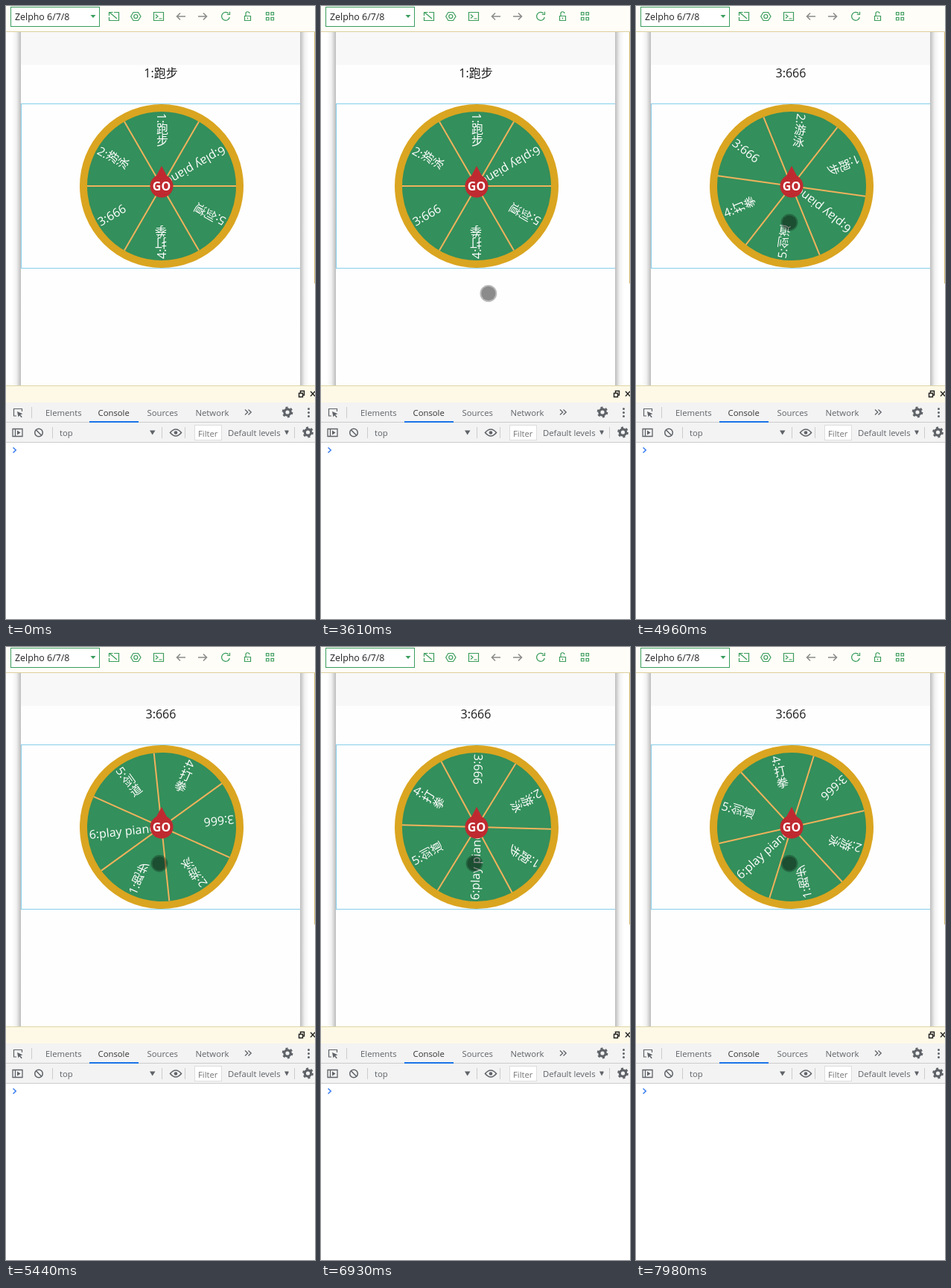
Animation of 415 by 824 pixels, one loop 8000 ms. Source, as an HTML page:

```html
<!DOCTYPE html>
<html lang="zh">
<head>
<meta charset="utf-8">
<title>Prize wheel</title>
<style>
html, body { margin: 0; width: 100%; height: 100%; overflow: hidden; background: #fff; }
svg { display: block; width: 100%; height: 100%; }
text { font-family: "Open Sans", "Noto Sans CJK SC", "Noto Sans CJK", sans-serif; white-space: pre; }
.ui { font-size: 11.3px; fill: #5f6368; }
.log text { font: 11px "DejaVu Sans Mono", monospace; fill: #303942; }
.log .warn { fill: #5c3c00; }
.link { text-decoration: underline; }
.item { font-size: 16px; fill: #fff; writing-mode: vertical-rl; text-orientation: mixed; }
.green { fill: none; stroke: #3a9d5d; stroke-width: 1.2; }
.gray { fill: none; stroke: #8c8c8c; stroke-width: 1.6; }
.tool { fill: none; stroke: #5f6368; stroke-width: 1.5; }
.rule { stroke: #ccc; }
</style>
</head>
<body>
<svg viewBox="0 0 415 824">
  <defs>
    <linearGradient id="shade">
      <stop offset="0" stop-color="#fff"/>
      <stop offset=".5" stop-color="#f1f1f1"/>
      <stop offset="1" stop-color="#bdbdbd"/>
    </linearGradient>
    <clipPath id="screen"><rect x="20" y="35" width="375" height="475"/></clipPath>
    <clipPath id="levelsClip"><rect x="296" y="562" width="27" height="24"/></clipPath>
    <g id="gear">
      <circle r="4.2" fill="none" stroke="#5f6368" stroke-width="3.2"/>
      <circle r="6.2" fill="none" stroke="#5f6368" stroke-width="2.4" stroke-dasharray="3 3.49"/>
    </g>
  </defs>

  <rect width="415" height="824" fill="#fff"/>

  <!-- phone -->
  <rect x="8" y="35" width="12" height="476" fill="url(#shade)"/>
  <rect x="8" y="35" width="12" height="476" fill="url(#shade)" transform="translate(415) scale(-1 1)"/>
  <rect x="20" y="35" width="375" height="476" fill="#fefefe"/>
  <rect x="20" y="35" width="375" height="44" fill="#f8f8f8"/>
  <path d="M414.5 35V373" stroke="#d2b96b"/>
  <g id="page" clip-path="url(#screen)">
    <text id="result" x="208" y="96" font-size="16" text-anchor="middle" fill="#1c1c1c"></text>
    <rect x="20.5" y="131.5" width="376" height="221" fill="none" stroke="#87ceeb"/>
    <g transform="translate(209 242)">
      <g id="wheel">
        <circle r="105" fill="#338f5b" stroke="#daa520" stroke-width="10"/>
      </g>
      <path d="M0-27L7.5-13H-7.5Z" fill="#bf2a30"/>
      <circle r="15.5" fill="#bf2a30"/>
      <text y="6" font-size="16" font-weight="700" text-anchor="middle" fill="#fff">GO</text>
    </g>
  </g>

  <!-- top toolbar -->
  <rect width="415" height="34" fill="#fffdf7"/>
  <path d="M0 34.5H415" stroke="#dccf9c"/>
  <rect x="6.5" y="1.5" width="119" height="26" fill="#fff" stroke="#3a9d5d"/>
  <text x="12" y="19" font-size="12.4" fill="#222">Zelpho 6/7/8</text>
  <path d="M113.5 12H120.5L117 16Z" fill="#3a9d5d"/>
  <rect id="hover" x="285.5" y="4.5" width="20" height="20" fill="#faf6e0" stroke="#d2c998"/>
  <g class="green">
    <path d="M145 8.5H151.500V19.500H138.500V15M149 17L139 8.500M138.500 13V8.500H143.500"/>
    <path d="M171 8.500H177.500L181 14L177.500 19.500H171L167.700 14Z"/>
    <circle cx="174.300" cy="14" r="2.500"/>
    <path d="M198.500 8.500H211.500V19.500H198.500ZM201 11.500L204 14L201 16.500M205.500 17H209.500"/>
    <path d="M299 10.200A5.400 5.400 0 1 0 300.300 15M300.500 7.800V11.500H296.800"/>
    <path d="M320.500 13.500H328.500V19.500H320.500ZM322 13.500V10.500A2.500 2.500 0 0 1 327 10M324.500 15.500V17.500"/>
    <path d="M349.500 8.500H353V12H349.500ZM356 8.500H359.500V12H356ZM349.500 15.500H353V19H349.500ZM356 15.500H359.500V19H356Z"/>
  </g>
  <path class="gray" d="M241 14H229.500M234 9.500L229.500 14L234 18.500M258 14H269.500M265 9.500L269.500 14L265 18.500"/>

  <!-- inspector -->
  <rect y="510" width="415" height="23" fill="#fdf9e6"/>
  <path d="M0 510.500H415" stroke="#dfd5a6"/>
  <path d="M393.500 520.500H398.500V525.500H393.500ZM395.500 520V517.500H400.500V523H399M409 518L415 524.500M415 518L409 524.500" fill="none" stroke="#222" stroke-width="1.4"/>
  <rect y="533" width="415" height="54" fill="#f3f3f3"/>
  <path class="rule" d="M0 559.500H415M0 586.500H415M34.500 539V554M62.500 566V581M209.500 566V581M240.500 566V581M387.500 566V581"/>
  <rect x="112" y="558" width="66" height="2" fill="#1a73e8"/>
  <g class="tool">
    <path d="M14 551H10.500V541.500H21.500V545" stroke-width="1.2"/>
    <path d="M15 545L22.500 548.300L19.300 549.300L21.800 552.500L20.500 553.300L18.200 550.300L16.500 552.500Z" fill="#5f6368" stroke="none"/>
    <path d="M321 542.500L324.700 546L321 549.500M325.500 542.500L329.200 546L325.500 549.500" stroke-width="1.300"/>
    <path d="M9 568.500H22V578.500H9ZM12.500 568.500V578.500" stroke-width="1.300"/>
    <path d="M15 570.500L19.500 573.500L15 576.500Z" fill="#5f6368" stroke="none"/>
    <circle cx="44" cy="573.500" r="5.300"/><path d="M40.300 569.800L47.700 577.200"/>
    <path d="M220.500 573.500Q228 564.500 235.500 573.500Q228 582.500 220.500 573.500Z" stroke-width="1.600"/>
    <circle cx="228" cy="573.500" r="2.300" fill="#5f6368" stroke="none"/>
  </g>
  <g fill="#5f6368">
    <circle cx="406.500" cy="541.500" r="1.500"/><circle cx="406.500" cy="546.500" r="1.500"/><circle cx="406.500" cy="551.500" r="1.500"/>
    <path d="M193 570.500H200.500L196.700 576.500Z"/>
  </g>
  <use href="#gear" x="378" y="546"/>
  <use href="#gear" x="405.500" y="573"/>
  <g class="ui">
    <text x="53" y="551">Elements</text>
    <text x="123.500" y="551" fill="#333">Console</text>
    <text x="189.500" y="551">Sources</text>
    <text x="254.500" y="551">Network</text>
    <text x="72" y="577.500">top</text>
    <rect x="253.500" y="563.500" width="36" height="20" fill="#fff" stroke="#ddd"/>
    <text x="258" y="578.500" fill="#757575">Filter</text>
    <g id="levels">
      <text x="298" y="577.500">Default levels</text>
      <path d="M374 570.500H379.500V572L377 576.500Z"/>
    </g>
    <text id="hidden" x="341" y="577.500" fill="#999">1 hidden</text>
  </g>

  <g id="log" class="log">
    <rect y="587" width="415" height="62" fill="#fffbe5"/>
    <path d="M0 649.500H415" stroke="#fff0b3"/>
    <path d="M12 593L17 602.500H7Z" fill="#e8b000" stroke="#e8b000" stroke-linejoin="round"/>
    <path d="M12 596V599.500M12 600.500V602" stroke="#fff" stroke-width="1.300"/>
    <g id="warnLines"></g>
    <g id="rows"></g>
    <path d="M0 684.500H415M0 704.500H415M0 723.500H415" stroke="#ececec"/>
  </g>
  <path id="prompt" d="M9.500 -3.500L13.200 0L9.500 3.500" fill="none" stroke="#367cf1" stroke-width="1.500"/>

  <path id="arrow" d="M0 0V16.500L3.800 13L6.500 19L9 18L6.400 12.200H11.500Z" fill="#fff" stroke="#111"/>
  <g id="touch">
    <circle r="9.600" fill="#000" fill-opacity=".45"/>
    <circle r="10.500" fill="none" stroke="#000" stroke-opacity=".27" stroke-width="1.800"/>
  </g>
</svg>
<script>
const LOOP = 8000;
const $ = id => document.getElementById(id);

function add(parent, tag, attrs, text = "") {
  const el = document.createElementNS("http://www.w3.org/2000/svg", tag);
  for (const key in attrs) el.setAttribute(key, attrs[key]);
  el.textContent = text;
  parent.append(el);
  return el;
}

// wheel sectors, laid out counter-clockwise
const items = ["1:跑步", "2:游泳", "3:666", "4:打拳", "5:剑道", "6:play piano"];
for (let i = 0; i < 3; i++)
  add($("wheel"), "path", { d: "M0-100V100", stroke: "#f0b25c", "stroke-width": 2, transform: `rotate(${30 + i * 60})` });
items.forEach((label, i) =>
  add($("wheel"), "text", { class: "item", x: 0, y: -98, transform: `rotate(${-60 * i})` }, label));

// console messages
function line(parent, x, y, text, cls = "") {
  return add(parent, "text", { x, y, class: cls }, text);
}
const warn = $("warnLines"), rows = $("rows");
line(warn, 24, 602, "DevTools failed to load SourceMap: Could not load", "warn");
const linked = line(warn, 24, 616, "content for ", "warn");
add(linked, "tspan", { class: "link" }, "http://localhost:8080/static/js/sockjs.js.ma");
const rest = line(warn, 24, 630, "", "warn");
add(rest, "tspan", { class: "link" }, "p");
add(rest, "tspan", {}, ": HTTP error: status code 404,");
line(warn, 24, 644, "net::ERR_HTTP_RESPONSE_CODE_FAILURE", "warn");
line(rows, 24, 664, "[HMR] Waiting for update signal");
line(rows, 24, 678, "from WDS...");
line(rows, 24, 698, "App Launch  at App.vue:4");
line(rows, 24, 718, "App Show  at App.vue:7");
[[664, 19500], [698, 13108], [718, 13108]].forEach(([y, n]) =>
  line(rows, 248.500, y, "chunk-vendors.js:" + n, "link"));

// CSS "ease": cubic-bezier(.25, .1, .25, 1)
function ease(x) {
  if (x <= 0) return 0;
  if (x >= 1) return 1;
  let lo = 0, hi = 1;
  for (let i = 0; i < 30; i++) {
    const s = (lo + hi) / 2;
    if (0.75 * s - 0.75 * s * s + s ** 3 < x) lo = s; else hi = s;
  }
  return 0.3 * lo + 2.4 * lo * lo - 1.7 * lo ** 3;
}

const wheelAngle = t => 4800 * ease((t - 4033) / 2000) + 3960 * ease((t - 6929) / 1987);

// pointer way points: time, x, y
const path = [
  [60, 406, 815], [250, 345, 640], [450, 282, 420], [650, 272, 210], [840, 300, 31],
  [940, 300, 22], [1130, 298, 18], [1940, 298, 18], [2100, 272, 90], [2400, 150, 400],
  [2640, 64, 570], [2740, 54, 592], [2880, 44, 574], [3080, 44, 574], [3300, 130, 520],
  [3540, 225, 431], [3610, 225, 387], [3740, 204, 310], [3890, 206, 291]
];

function pointer(t) {
  if (t < path[0][0]) return null;
  const i = path.findIndex(p => p[0] > t);
  if (i < 0) return path[path.length - 1].slice(1);
  const [t0, x0, y0] = path[i - 1], [t1, x1, y1] = path[i];
  const k = (t - t0) / (t1 - t0);
  return [x0 + (x1 - x0) * k, y0 + (y1 - y0) * k];
}

const show = (id, on) => $(id).setAttribute("display", on ? "inline" : "none");
const move = (id, x, y) => $(id).setAttribute("transform", `translate(${x} ${y})`);

function draw(t) {
  $("wheel").setAttribute("transform", `rotate(${wheelAngle(t) % 360})`);
  $("result").textContent = t < 4045 ? items[0] : items[2];

  const logged = t >= 1470 && t < 2990;
  show("page", t < 1330 || t >= 1420);
  show("log", logged);
  show("hidden", logged);
  $("levels").setAttribute("clip-path", logged ? "url(#levelsClip)" : "none");
  move("prompt", 0, logged ? 733 : 597);

  const p = pointer(t);
  const inPhone = p && p[0] > 20 && p[0] < 395 && p[1] > 35 && p[1] < 510;
  show("touch", inPhone);
  show("arrow", p && !inPhone);
  show("hover", p && p[0] > 285 && p[0] < 306 && p[1] > 4 && p[1] < 25);
  if (p) move(inPhone ? "touch" : "arrow", ...p);
}

const start = performance.now();
function tick() {
  draw((performance.now() - start) % LOOP);
  requestAnimationFrame(tick);
}
tick();
</script>
</body>
</html>
```
